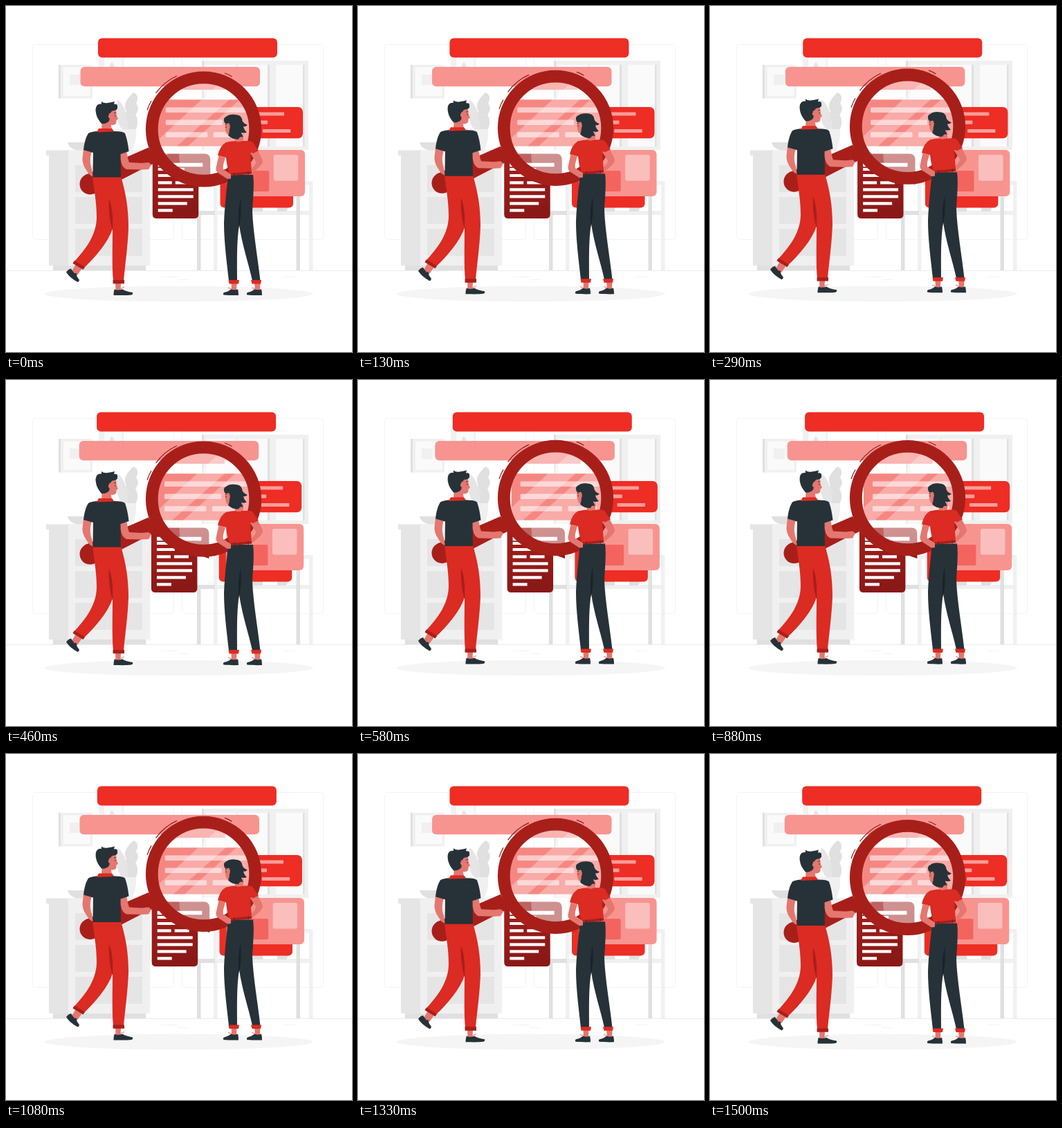
Recreate the animation shown at these times as an HTML page. Size 500 px wide and 500 px high, loop 1.54 s.

```html
<!DOCTYPE html>
<html lang="en">
<head>
<meta charset="utf-8">
<title>Search</title>
<style>
html, body { margin: 0; width: 100%; height: 100%; overflow: hidden; background: #fff; }
svg { display: block; width: 100%; height: 100%; }
.skin { fill: #e4776f; }
.ink { fill: #263238; }
.red { fill: #ee2d24; }
.pink { fill: #f89490; }
.cloth { fill: #db2b22; }
.deep { fill: #a81f1a; }
.g1 { fill: #fafafa; }
.g2 { fill: #f0f0f0; }
.g3 { fill: #e5e5e5; }
.g4 { fill: #e0e0e0; }
</style>
</head>
<body>
<svg viewBox="0 0 500 500">
  <defs>
    <linearGradient id="page" x1="0" y1="0" x2="0.3" y2="1">
      <stop offset="0" stop-color="#a5201c"/>
      <stop offset="1" stop-color="#891817"/>
    </linearGradient>
    <clipPath id="glass"><circle cx="285.5" cy="178" r="67"/></clipPath>
  </defs>

  <!-- room -->
  <g fill="none" stroke="#f3f3f3">
    <rect x="38.500" y="55.500" width="204" height="282" rx="4"/>
    <rect x="254.500" y="55.500" width="204" height="282" rx="4"/>
    <path stroke="#ebebeb" d="M0 382.500H500"/>
    <path d="M224 391.500H248M249 395.500H264M400 391.500H418"/>
  </g>
  <ellipse cx="249.500" cy="416" rx="194" ry="11.300" fill="#f5f5f5"/>

  <path class="g4" d="M76 85H82V133.500H76Z"/>
  <path class="g2" d="M79 85H125V133.500H79Z"/>
  <path class="g1" d="M83 88.500H121.500V130H83Z"/>
  <path class="g2" d="M92 99H108V114H92Z"/>
  <path class="g2" d="M134 68H170V110H134Z"/>
  <path class="g1" d="M142 68H167.500V107H142Z"/>

  <path class="g2" d="M283 79H437V208H283Z"/>
  <path class="g4" d="M283 79H286V208H283ZM378 85H381V203H378ZM429 85H431.500V203H429Z"/>
  <path class="g1" d="M290 85H331V203H290ZM336 85H378V203H336ZM390 85H429V203H390Z"/>

  <g class="g4">
    <path d="M173 181C170 168 171 158 174 152C168 142 176 133 184 125C192 128 191 135 188 141C192 146 192 151 187 157C191 163 191 171 188 178Z"/>
    <path class="g3" d="M172 182C160 173 157 155 161 135C171 142 177 160 177 181Z"/>
    <path class="g3" d="M153 81C148 86 147 95 151 104H157C160 95 158 87 153 81Z"/>
    <path class="g2" d="M160 178H188C189 190 186 202 182 209H166C162 202 160 190 160 178Z"/>
    <path d="M89 197H128C126 206 117 209 108 209C99 209 91 205 89 197Z"/>
  </g>
  <path class="g3" d="M62 215H91V375H62ZM58 208.500H209V216H58Z"/>
  <path class="g2" d="M90 216H208V375H90ZM90 208.500H208V216H90Z"/>
  <path class="g3" d="M100 230H197V269H100ZM100 276H197V315H100ZM100 322H197V361H100Z"/>
  <path class="g4" d="M68 375H202V382H68Z"/>

  <path class="g2" d="M300 253H305.500V382H300ZM438 253H443.500V382H438ZM300 253H443V258.500H300ZM276 296H443V302H276Z"/>
  <path class="g4" d="M276 296H281.500V382H276ZM419.500 275H425V382H419.500ZM276 296H302V302H276ZM355 291H371V297H355ZM392 291H408L405 297H392Z"/>

  <!-- interface cards -->
  <g id="cards">
    <rect class="red" x="133.200" y="46.500" width="259" height="28" rx="6"/>
    <rect class="pink" x="107.800" y="88" width="259.500" height="28.300" rx="6"/>
    <rect class="pink" x="240" y="103" width="78" height="18"/>
    <rect class="red" x="330" y="146" width="99.300" height="45.300" rx="7"/>
    <g fill="#f89d99">
      <rect x="340" y="153.500" width="62.300" height="5" rx="1"/>
      <rect x="340" y="165.500" width="38.300" height="5.200" rx="1"/>
      <rect x="371" y="178" width="40.500" height="5" rx="1"/>
    </g>
    <rect class="red" x="309.800" y="236" width="105.500" height="55.500" rx="6"/>
    <rect class="pink" x="320" y="208" width="112.300" height="67" rx="6"/>
    <rect fill="#f4645e" x="336" y="238" width="44.500" height="30" rx="2"/>
    <rect fill="#fabfbc" x="387" y="215" width="35.500" height="37.500" rx="3"/>

    <rect x="218" y="135.300" width="136" height="67.300" fill="#f0534c"/>
    <g fill="#f9b2ae">
      <rect x="231" y="146.500" width="121" height="7.500" rx="1.500"/>
      <rect x="231" y="164.500" width="82" height="7.500" rx="1.500"/>
      <rect x="231" y="182.200" width="60.500" height="7.500" rx="1.500"/>
      <rect x="300" y="182.200" width="42" height="7.500" rx="1.500"/>
    </g>

    <path fill="url(#page)" d="M218 213.500H287Q295.500 213.500 295.500 222V258L278.500 252V301Q278.500 307 272.500 307H218Q212 307 212 301V219.500Q212 213.500 218 213.500Z"/>
    <path stroke="#fff" stroke-width="4.200" d="M220 236H258M220 245H246M220 255.300H240M245 255.300H266M220 265.300H271M220 275.300H271M220 285.300H262M220 295.300H241"/>
    <path stroke="#fff" stroke-width="5.500" d="M220 229.500H284.500"/>
  </g>

  <g id="crew">
    <!-- magnifier -->
    <circle cx="285.500" cy="178" r="67" fill="#fff" opacity=".3"/>
    <g clip-path="url(#glass)" fill="#fff" opacity=".3">
      <path d="M214 199L310 110L338 122L244 205L232 216Z"/>
      <path d="M250 214L346 128L360 139L352 195L290 250L252 246Z"/>
    </g>
    <path class="deep" d="M114 244.500L206 204.500L217 226L195 236.500L128 271Z"/>
    <circle class="deep" cx="121.500" cy="257.500" r="15"/>
    <circle cx="285.500" cy="178" r="74.700" fill="none" stroke="#a81f1a" stroke-width="17.800"/>
    <path fill="none" stroke="#8e1a17" stroke-width="1.200" d="M204 150.500Q206.500 143 210 137M216.500 126Q229 109 247 101M316 97Q322 99 326.500 102"/>

    <!-- man -->
    <path class="skin" d="M112 207L124 210C121 219 121 227 124 236L126 247L121 244C114 235 110 228 110.500 220Z"/>
    <path class="cloth" d="M125 246H166C173 270 177 292 177 320C176 348 172 375 170 397H155C153 378 154 348 154 322C147 342 130 362 111 380L97 371C116 351 131 330 131 305C131 283 127 264 125 246Z"/>
    <path class="deep" d="M149 279C153 290 155 302 154 324C150 311 148 295 149 279Z"/>
    <path class="skin" d="M101 373L110 379L103 389L95 383ZM158 400H166L165.500 411H158.500Z"/>
    <path class="deep" d="M99 368L114 377.500L111.500 381L96.500 372ZM154.500 396H171V401.300H154.500Z"/>
    <path class="ink" d="M94 379.500C91 380 89 382 87 384.500C91 391 97 395 103 398.800C105 399 106.500 397 105.500 395C102 391 102 389 102 386.500C98 386 96 383 94 379.500Z"/>
    <path class="ink" d="M157 409.200C160 411 164 411 168 409.200C172 412 177 413 183 414Q184 416.500 181 417.500C174 418.500 164 418 155.500 418Q155.500 412 157 409.200Z"/>
    <path fill="none" stroke="#e4776f" d="M98 386L102 384M165 409L171 406"/>
    <path class="skin" d="M163 210L174 208C175 215 176 221 178 226L196 227L206 226L210 229L206 236L196 236.500L174 236Q168 233 166.500 226Z"/>
    <path class="ink" d="M119 184Q122 182 131 181H157Q169 181 172 184C175 192 176.500 201 177.500 210L165.500 214C166 225 165.500 237 166 247.500H125.500L126 212L112 208C113 199 115 190 119 184Z"/>
    <path class="skin" d="M139 164L151 166L153 179Q145 183 138 179Z"/>
    <path class="cloth" d="M134 177H153L156.500 181.500L131 182.500Z"/>
    <path class="skin" d="M148 149L159 150L160 159L162 163L159.500 165C160 170 158 172 153 172C147 172 142 166 141 160Z"/>
    <path class="ink" d="M138 141.500L138 138Q141 141 147 140Q154 139 157 138L156 142Q161 141 161 145Q162 150 157 151Q152 151 151 155Q148 154 149 160Q151 165 147 168Q142 171 138 170Q132 163 130.500 157Q128 147 132 143Q134 141 138 141.500Z"/>
    <circle class="skin" cx="150.500" cy="159.500" r="2.600"/>
    <path fill="none" stroke="#263238" stroke-width=".9" d="M156 155L159 154M158 157.500V159.500"/>

    <!-- woman -->
    <path class="skin" d="M356 206L363 207C366 214 371 220 371 226C367 233 360 238 354 243L351 238C357 233 361 229 361 225L353 213Z"/>
    <path class="ink" d="M321 244H357C359 258 357 277 356 297C357 326 364 365 367.500 397H356C350 370 341 345 337 316C333 342 334 370 334 397H322C319 370 315 340 315 314C316 288 319 264 321 244Z"/>
    <path fill="#17232e" d="M339 278C336 291 335 304 336.500 321C340 307 340 293 339 278Z"/>
    <path class="skin" d="M325.500 400H333.500L333 411H326ZM359 400H367.500L367 411H360Z"/>
    <path class="cloth" d="M321.500 396H337L336 401.500H322.500ZM354 396H369L368 401.500H355.500Z"/>
    <path class="ink" id="shoe" d="M335 409.200Q336 413 336 418C329 418.300 321 418 314.500 417.500Q313 415.500 315 414C319 413 323 411.500 325 409.200Q330 411.500 335 409.200Z"/>
    <use href="#shoe" x="34"/>
    <path fill="none" stroke="#e4776f" d="M326 409L321 407M360 409L355 407"/>
    <path class="cloth" d="M318 197Q326 195 333 195H352Q357 195 360 202L365 209L357 213L353 211C353 222 355 232 355 242L325 245C321 238 319 229 318 219L306 216Q309 202 318 197Z"/>
    <path fill="#a81f1a" d="M324 242L355 239V242.500L324 245.500Z"/>
    <path stroke="#263238" d="M330 241V246M350 239V244"/>
    <path class="skin" d="M307.500 216L317 219C315 226 313 231 314 236L325 243L325 249.500L320 250L306 241Q303 238 303.500 234Z"/>
    <path class="skin" d="M331 184L343 185L343 194Q337 198 331 195Z"/>
    <path class="skin" d="M318 166L330 167L331 183Q325 187 319 185Q316.500 180 316.500 174Z"/>
    <path class="ink" d="M316 169Q313 162 318 160Q323 156 331 157Q339 157 341 163Q341 169 349 172Q346 175 343 174Q344 179 348 182.500Q344 184.500 340 183Q341 187 343 189.500Q338 188 336 192.500Q327 193 321 187Q323 183 323 178Q325 173 322 169Q319 171 316 169Z"/>
    <path fill="none" stroke="#263238" stroke-width=".9" d="M318 174V176M316.500 171.500L319 171"/>
  </g>
</svg>
<script>
const LOOP = 1540, STEP = LOOP / 37;
const cards = document.getElementById("cards");
const crew = document.getElementById("crew");

// [time, progress] and [progress, x]
const pace = [[0, .026], [710, .488], [1080, .743], [1330, .891], [1500, 1], [1540, 1.026]];
const shake = [0, -1, 2, -4, 4, -4, 4, -4, 2, -1, 0].map((x, i) => [i / 10, x]);

function lerpKeys(keys, at) {
  let i = 1;
  while (i < keys.length - 1 && at > keys[i][0]) i++;
  const [a, va] = keys[i - 1], [b, vb] = keys[i];
  return va + (vb - va) * (at - a) / (b - a);
}

function draw(ms) {
  const t = Math.floor((ms % LOOP + 5) / STEP) % 37 * STEP;
  const p = lerpKeys(pace, t) % 1;
  const x = lerpKeys(shake, p);
  const y = 0.5 - 10 * (1 - Math.abs(1 - 2 * p));
  cards.setAttribute("transform", `translate(${x.toFixed(3)} 0)`);
  crew.setAttribute("transform", `translate(0 ${y.toFixed(3)})`);
}

const start = performance.now();
function tick() {
  draw(performance.now() - start);
  requestAnimationFrame(tick);
}
tick();
</script>
</body>
</html>
```
